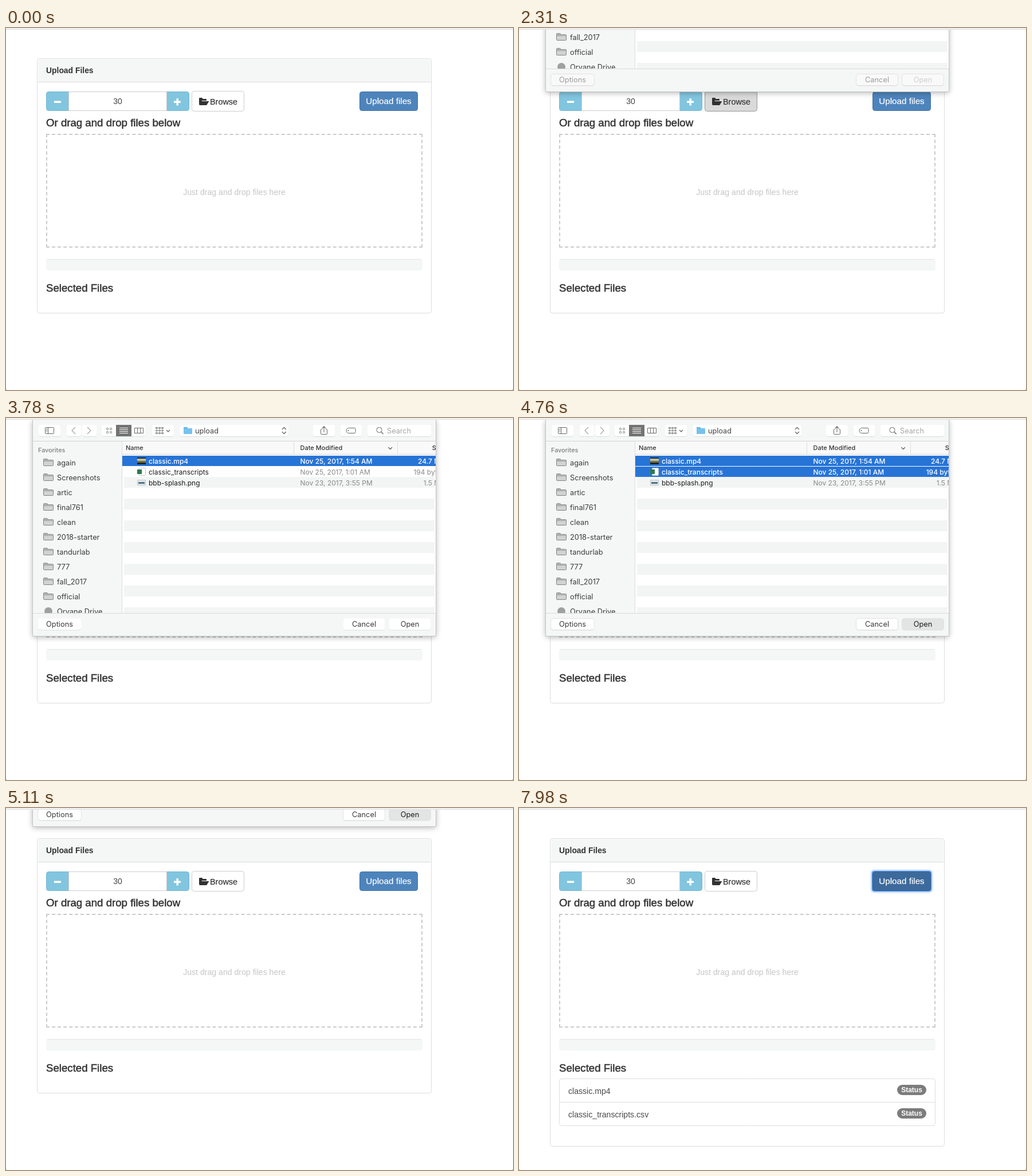
An HTML page with a canvas that plays this animation: 885x633 px, repeating every 8000 ms.

```html
<!DOCTYPE html>
<html lang="en">
<head>
<meta charset="utf-8">
<title>File upload</title>
<style>
html, body { margin: 0; width: 100%; height: 100%; overflow: hidden; background: #fff; }
canvas { display: block; }
</style>
</head>
<body>
<canvas id="stage" width="885" height="633"></canvas>
<script>
const stage = document.getElementById('stage');
const c = stage.getContext('2d');
const { width: W, height: H } = stage;
const WEB = '"Liberation Sans", Arial, sans-serif';
const MAC = 'Inter, "Open Sans", sans-serif';
const LOOP = 8000, STEP = 70, SLIDE = 390;

// Start of each event, in ms
const T = {
  browseHover: 1050, browsePress: 1610, sheetIn: 2170, ready: 2800,
  pickOne: 3360, pickTwo: 4200, openPress: 4620, sheetOut: 4790, listed: 5250,
  uploadHover: 7070, uploadPress: 7350, uploadRelease: 7630
};

const INK = '#333', ICON = '#666', LINE = '#dcdcdc', PALE = '#f5f6f6', BLUE = '#2774d7';
const LEFT = 70, WIDE = 657;                       // content column of the panel
const SHEET = { x: 47, y: 3, w: 703, h: 378 };
const LIST = { x: 203, y: 65, w: 547, row: 19 };   // table inside the sheet
const FOLDERS = ['again', 'Screenshots', 'artic', 'final761', 'clean', '2018-starter',
  'tandurlab', '777', 'fall_2017', 'official'];
const FILES = [
  { name: 'classic.mp4', date: 'Nov 25, 2017, 1:54 AM', size: '24.7 MB', icon: videoIcon },
  { name: 'classic_transcripts', date: 'Nov 25, 2017, 1:01 AM', size: '194 bytes', icon: tableIcon },
  { name: 'bbb-splash.png', date: 'Nov 23, 2017, 3:55 PM', size: '1.5 MB', icon: imageIcon }
];

function rect(x, y, w, h, fill) {
  c.fillStyle = fill;
  c.fillRect(x, y, w, h);
}

// Rounded box; its outline runs inside the given edges
function box(x, y, w, h, r, fill, edge) {
  const d = edge ? 0.5 : 0;
  c.beginPath();
  c.roundRect(x + d, y + d, w - 2 * d, h - 2 * d, r);
  if (fill) { c.fillStyle = fill; c.fill(); }
  if (edge) { c.strokeStyle = edge; c.lineWidth = 1; c.stroke(); }
}

const hline = (x, y, w, color = LINE) => rect(x, y, w, 1, color);
const vline = (x, y, h, color = LINE) => rect(x, y, 1, h, color);

// Arrow head whose tip points along the angle (0 = right)
function chevron(x, y, size, angle, color = ICON) {
  c.save();
  c.translate(x, y);
  c.rotate(angle);
  c.beginPath();
  c.moveTo(-size, -size);
  c.lineTo(0, 0);
  c.lineTo(-size, size);
  c.strokeStyle = color;
  c.lineWidth = 1.3;
  c.stroke();
  c.restore();
}
const RIGHT = 0, DOWN = Math.PI / 2, BACK = Math.PI, UP = -DOWN;

// y is the middle of the capitals
function text(s, x, y, size, color, { font = WEB, weight = 400, align = 'left', bolder = 0 } = {}) {
  c.font = `${weight} ${size}px ${font}`;
  c.textAlign = align;
  c.fillStyle = c.strokeStyle = color;
  c.lineWidth = bolder;
  c.fillText(s, x, y + size * 0.36);
  if (bolder) c.strokeText(s, x, y + size * 0.36);
}
const heading = (s, y) => text(s, LEFT, y, 18.65, INK, { bolder: 0.5 });
const mac = (s, x, y, size, color, weight, align) =>
  text(s, x, y, size, color, { font: MAC, weight, align });

function clip(x, y, w, h, draw) {
  c.save();
  c.beginPath();
  c.rect(x, y, w, h);
  c.clip();
  draw();
  c.restore();
}

function dashedBox(x, y, w, h) {
  c.save();
  c.strokeStyle = '#cbcbcb';
  c.lineWidth = 2;
  for (const [dx, dy] of [[w, 0], [0, h]])
    for (const far of [0, 1]) {
      const len = dx + dy - 6, gaps = Math.round(len / 10);
      const px = dx ? x : x + 1 + far * (w - 2), py = dy ? y : y + 1 + far * (h - 2);
      c.setLineDash([6, len / gaps - 6]);
      c.beginPath();
      c.moveTo(px, py);
      c.lineTo(px + dx, py + dy);
      c.stroke();
    }
  c.restore();
}

function spinner(y) {
  const mid = y + 18, side = 40;
  box(LEFT, y, 250, 34, 4, '#82c5df', '#70b8d4');
  box(LEFT + side - 1, y, 172, 34, 0, '#fff', '#ccc');
  for (const x of [LEFT + side / 2, LEFT + 250 - side / 2 - 1]) rect(x - 6, mid - 1.5, 12, 3.5, '#fff');
  rect(LEFT + 227.5, mid - 6, 3.5, 12.5, '#fff');
  text('30', LEFT + 125, y + 17, 14, '#444', { align: 'center' });
}

function openFolder(x, y) {
  box(x, y, 6, 4, 1, INK);
  box(x, y + 2, 13, 10, 1, INK);
  c.save();
  c.transform(1, 0, -0.6, 1, x + 5, y + 5);
  rect(0, 0, 13, 1, '#fff');
  rect(0, 1, 13, 7, INK);
  c.restore();
}

function browseButton(t) {
  const on = t < T.ready, pressed = on && t >= T.browsePress, hover = on && t >= T.browseHover;
  box(324, 110, 92, 36, 4, pressed ? '#dadada' : hover ? '#e6e6e6' : '#fff',
    pressed ? '#949494' : hover ? '#adadad' : '#ccc');
  if (pressed) rect(326, 111, 88, 2, 'rgba(0,0,0,.09)');
  openFolder(337, 122);
  text('Browse', 356, 129, 14.4, INK, { bolder: 0.2 });
}

function uploadButton(t) {
  const hover = t >= T.uploadHover, focus = t >= T.uploadPress;
  const pressed = focus && t < T.uploadRelease;
  if (focus) {
    c.save();
    c.shadowColor = '#3f8cf0';
    c.shadowBlur = 4;
    box(616, 110, 104, 36, 4, '#5b9cf0');
    c.restore();
  }
  box(617, 111, 102, 34, 4, pressed ? '#325a86' : hover ? '#3d6a9c' : '#4e84bc',
    hover ? '#34608f' : '#4173a8');
  text('Upload files', 668, 128, 15.2, '#fff', { align: 'center', bolder: 0.2 });
}

function fileList(top) {
  const row = 41;
  box(LEFT, top, WIDE, 2 * row + 1, 4, '#fff', '#ddd');
  hline(LEFT, top + row, WIDE, '#ddd');
  ['classic.mp4', 'classic_transcripts.csv'].forEach((name, i) => {
    const y = top + i * row + 20;
    text(name, 86, y + 1.5, 14.1, '#4a4a4a');
    box(660, y - 9, 51, 18, 9, '#7c7c7c');
    text('Status', 685.5, y, 12, '#fff', { weight: 700, align: 'center' });
  });
}

function page(t) {
  const listed = t >= T.listed;
  rect(0, 0, W, H, '#fff');
  box(54, 53, 689, listed ? 539 : 446, 4, '#fff', LINE);
  box(56, 55, 685, 39, 3, PALE);
  hline(55, 94, 687);
  text('Upload Files', LEFT, 74, 13.9, INK, { weight: 700 });
  spinner(111);
  browseButton(t);
  uploadButton(t);
  heading('Or drag and drop files below', 165.5);
  dashedBox(LEFT, 185, WIDE, 199);
  text('Just drag and drop files here', LEFT + WIDE / 2, 287, 14.1, '#c6c6c6', { align: 'center' });
  box(LEFT, 404, WIDE, 20, 4, PALE);
  hline(LEFT + 2, 404, WIDE - 4, '#e4e4e4');
  heading('Selected Files', 454);
  if (listed) fileList(473);
}

function folderIcon(x, y) {
  box(x, y, 8, 6, 1, '#d2d2d2', '#828282');
  box(x, y + 2, 18, 11, 1, '#d2d2d2', '#828282');
  hline(x + 1, y + 4, 16, '#999');
}

// File icons are centred on (x, y)
function videoIcon(x, y) {
  rect(x - 8, y - 6, 15, 12, '#24241f');
  rect(x - 8, y - 4, 15, 4, '#b9bfa6');
  rect(x - 8, y, 15, 3, '#6d7347');
}

function tableIcon(x, y) {
  box(x - 5, y - 7, 12, 14, 1, '#fff', '#c4c4c4');
  rect(x - 8, y - 4, 8, 8, '#2d7a4d');
}

function imageIcon(x, y) {
  box(x - 8, y - 5, 15, 10, 0, '#e4eaee', '#c4c4c4');
  rect(x - 6, y - 1, 11, 3, '#4a7380');
}

function pill(x, y, w, fill = '#fff') {
  box(x, y + 1, w, 20, 4, 'rgba(0,0,0,.1)');
  box(x, y, w, 20, 4, fill);
}

function viewSwitch(x, y) {
  pill(x, y - 10, 76);
  rect(x + 25, y - 10, 27, 20, '#737373');
  for (let i = 0; i < 4; i++) {
    box(x + 8 + i % 2 * 6, y - 5 + (i >> 1) * 6, 4, 4, 1, null, ICON);
    hline(x + 31, y - 5 + i * 3, 15, '#fff');
  }
  for (let i = 0; i < 3; i++) box(x + 57 + i * 5, y - 5, 6, 10, 0, null, ICON);
}

function shareIcon(x, y, color) {
  box(x - 6, y - 3, 12, 10, 1, null, color);
  rect(x - 3, y - 3, 6, 1, '#fff');
  vline(x - 0.5, y - 7, 10, color);
  chevron(x, y - 7, 3, UP, color);
}

function toolbar(picked) {
  const y = 22, tool = picked ? ICON : '#bdbdbd';
  const sides = 76, group = 274, share = 555, tag = 602.5;
  for (const x of [sides, group, share, tag]) pill(x - 19, y - 10, 38);

  box(sides - 8, y - 6, 16, 12, 1, null, ICON);
  vline(sides - 3, y - 5, 10, ICON);
  for (const dy of [-3, 0]) hline(sides - 6, y + dy, 2, ICON);

  for (const i of [0, 1]) {
    pill(106 + i * 27, y - 10, 25);
    chevron(115 + i * 33, y, 6, i ? RIGHT : BACK, '#a8a8a8');
  }
  viewSwitch(167, y);
  for (let i = 0; i < 9; i++) box(group - 13 + i % 3 * 5, y - 6 + Math.floor(i / 3) * 4.5, 4, 3, 0.5, null, ICON);
  chevron(group + 9, y + 2, 3, DOWN);

  pill(304, y - 10, 189);
  box(310, y - 6, 7, 4, 1, '#62b2e0');
  box(310, y - 4, 15, 10, 1, '#76c2ee');
  mac('upload', 330, y, 12.7, '#444');
  for (const dir of [-1, 1]) chevron(485.5, y + dir * 5.5, 3.5, dir * DOWN);

  shareIcon(share, y, tool);
  box(tag - 9, y - 5, 17, 10, [5, 2, 2, 5], null, tool);
  box(tag - 6, y - 1, 2, 2, 1, tool);

  pill(631, y - 10, 111);
  c.save();
  c.translate(651.5, y - 1);
  c.rotate(Math.PI / 4);
  box(-5, -5, 10, 10, 5, null, ICON);
  rect(5, -0.7, 5, 1.4, ICON);
  c.restore();
  mac('Search', 665, y, 12.7, '#a6a6a6');
}

function sidebar() {
  const pitch = 26, rowY = i => 78 + i * pitch;
  mac('Favorites', 56, rowY(0) - 22, 10.8, '#7d7d7d', 500);
  FOLDERS.forEach((name, i) => {
    folderIcon(65, rowY(i) - 7);
    mac(name, 89, rowY(i), 12.8, '#3c3c3c');
  });
  const last = rowY(FOLDERS.length);
  box(67, last - 7, 14, 14, 7, '#a0a0a0');
  mac('Orvane Drive', 89, last, 12.8, '#3c3c3c');
}

const COLUMN = { name: 249, date: 513.5, sizeEnd: 766 };

function fileRows(picked) {
  const { x, y: top, w, row } = LIST;
  for (let k = 0; k < 15; k += 2) rect(x + 3, top + k * row, w - 5, row, '#f3f4f4');
  FILES.forEach((f, i) => {
    const y = top + i * row + 10.5, on = i < picked;
    if (on) rect(x, top + i * row + 1, w, row - 1, BLUE);
    f.icon(237, Math.round(y - 0.5));
    const weight = on ? 500 : 400, color = on ? '#fff' : '#8a8a8a';
    mac(f.name, COLUMN.name, y, 12, on ? '#fff' : '#1c1c1c', weight);
    mac(f.date, COLUMN.date, y, 12, color, weight);
    mac(f.size, COLUMN.sizeEnd, y, 12, color, weight, 'right');
  });
}

function listHead(ready) {
  const { x, w } = LIST, y = 52;
  rect(x, 41, w, 23, '#f9f9f9');
  hline(x, 63, w, '#d6d6d6');
  mac('Name', x + 6, y, 11, INK, 500);
  mac('Date Modified', COLUMN.date, y, 11, INK, 500);
  mac('Size', COLUMN.sizeEnd, y, 11, INK, 500, 'right');
  chevron(670.7, y + 2.5, 3.3, DOWN);
  if (ready) for (const edge of [502, 683]) vline(edge, 42, 20);
}

function footer(t, active, picked) {
  const top = 341, pressed = t >= T.openPress;
  const ink = active ? '#3a3a3a' : '#9c9c9c', face = active ? '#fff' : '#f9f9f9';
  const openInk = picked ? ink : active ? '#a8a8a8' : '#cfcfcf';
  const button = (s, x, w, color, fill) => {
    pill(x, top + 9.5, w, fill);
    if (!active || pressed) box(x - 1, top + 9, w + 2, 21, 4, null, '#e2e2e2');
    mac(s, x + w / 2, top + 19.5, 12.8, color, 400, 'center');
  };
  rect(SHEET.x, top, SHEET.w, 40, PALE);
  hline(SHEET.x, top, SHEET.w, '#dadada');
  button('Options', 56, 75, ink, face);
  button('Cancel', 589, 72, ink, face);
  button('Open', 669, 72, pressed ? '#1c1c1c' : openInk, pressed ? '#e3e4e4' : face);
}

function sheet(t, shown) {
  const { x, y, w, h } = SHEET;
  const active = t >= T.sheetIn + SLIDE;
  const picked = (t >= T.pickOne) + (t >= T.pickTwo);
  clip(0, y, W, H, () => {
    c.translate(0, Math.round(-h * (1 - shown)));
    c.save();
    c.shadowColor = 'rgba(0,0,0,.32)';
    c.shadowBlur = 10;
    c.shadowOffsetY = 2;
    rect(x, y, w, h, PALE);
    c.restore();
    clip(x, y, w, h, () => {
      toolbar(picked);
      hline(x, 40, w, '#d4d4d4');
      rect(LIST.x, 41, LIST.w, 300, '#fff');
      vline(LIST.x - 1, 41, 300);
      sidebar();
      fileRows(picked);
      listHead(t >= T.ready);
      footer(t, active, picked);
    });
    box(x - 1, y - 1, w + 2, h + 2, 0, null, '#c4c4c4');
  });
}

function ease(t, start) {
  const p = Math.min(1, Math.max(0, (t - start) / SLIDE));
  return (1 - Math.cos(Math.PI * p)) / 2;
}

function draw(t) {
  page(t);
  const shown = ease(t, T.sheetIn) - ease(t, T.sheetOut);
  if (shown > 0) sheet(t, shown);
  rect(0, 0, W, 2, '#f1f1f1');
  hline(0, 2, W, '#e2e2e2');
  for (const x of [0, W - 1]) rect(x, H - 1, 1, 1, '#8a8a8a');
}

const start = performance.now();
function tick() {
  const t = (performance.now() - start) % LOOP;
  draw(Math.floor(t / STEP) * STEP);
  requestAnimationFrame(tick);
}
tick();
</script>
</body>
</html>
```
